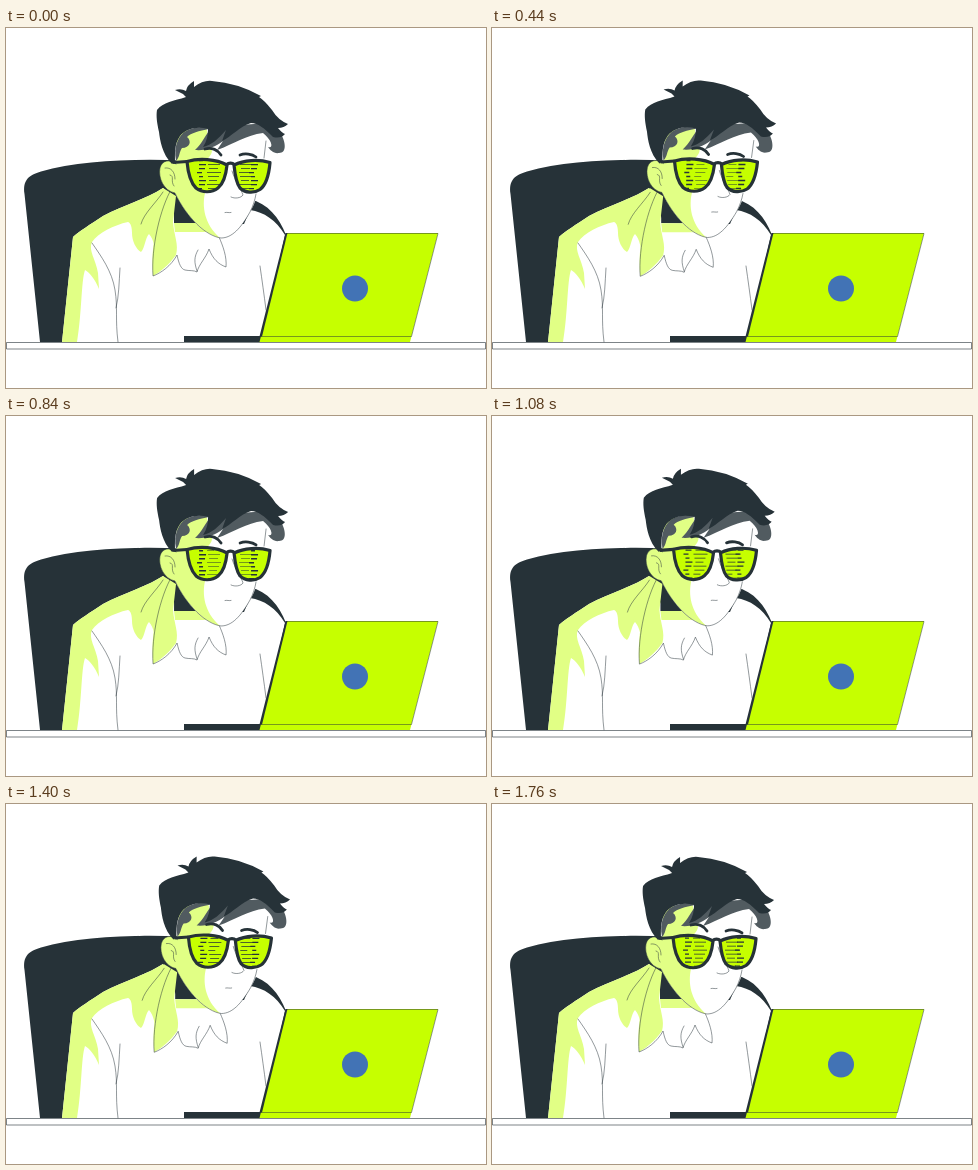
Recreate the animation shown at these times as an HTML page. Size 480 by 360 pixels, loop 1800 ms.

```html
<!DOCTYPE html>
<html lang="en">
<head>
<meta charset="utf-8">
<title>At the laptop</title>
<style>
  html, body { margin: 0; width: 100%; height: 100%; overflow: hidden; background: #fff; }
  svg { display: block; width: 100vw; height: 100vh; }
  .dark { fill: #263238; }
  .lime { fill: #c6ff00; }
  .pale { fill: #e1ff85; }
  .grey { fill: #515b60; }
  .white { fill: #fff; }
  .line { fill: none; stroke: #263238; stroke-width: .5; stroke-linecap: round; stroke-linejoin: round; }
  .bold { fill: none; stroke: #263238; stroke-width: 2.8; stroke-linecap: round; }
  .frame { fill: none; stroke: #263238; stroke-width: 3.2; stroke-linejoin: round; }
</style>
</head>
<body>
<svg viewBox="0 0 480 360">
  <defs>
    <path id="lensL" d="M181 133.5C193 130 210 131 221 137C220 147 217 156 212 160C206 165 196 165 190 160C185 155 182 145 181 133.5Z"/>
    <path id="lensR" d="M228 137C238 132 252 131 264 134.5C263 146 260 157 254 161.5C248 165.5 239 165 234 160C230 155 229 147 228 137Z"/>
    <clipPath id="clipL"><use href="#lensL"/></clipPath>
    <clipPath id="clipR"><use href="#lensR"/></clipPath>
  </defs>

  <!-- chair -->
  <path class="dark" d="M34 314L18.5 166C16.500 152 23 147 35 143.500C72 133 125 130.500 175 132.500L244 171C262 176 273 189 280 207L265 314Z"/>

  <!-- shirt -->
  <path class="white" d="M56 314L67 209C72 204 85 196 97 188C118 177 140 171 157 160L172 195L238 196L244 182C258 184 270 192 279 207L255 314Z"/>
  <path class="pale" d="M56 314L67 209C72 204 85 196 97 188C118 177 140 171 157 160L170 172L166 196L152 232C149 222 148 211 143 206C139 210 139 220 135 224C130 221 126 213 126 205C126 200 125 195 122 194C108 197 92 205 86 214C82 222 90 232 92 245L93 261C89 251 84 245 79 242C75 254 76 285 71 314Z"/>
  <path class="line" d="M86 215C95 228 106 243 109 262S109 290 112 314M114 240C113 255 113 268 110 280M254 238C256 252 258 266 260 282"/>

  <g id="collar">
    <path class="dark" d="M168 160L193 190L192 196L168 195Z"/>
    <path class="white" d="M168 195H202L213 209L220 239L203 221L191 244L178 242L171 227L147 248Z"/>
    <path class="pale" d="M168 195H192L212 208L204 204H169Z"/>
    <path class="pale" d="M157 160L170 168L167 194C168 208 173 216 170 227C163 237 154 244 147 248C145 228 148 206 153 193L140 206Z"/>
    <path class="line" d="M166 160C154 180 145 220 147 248C155 245 165 238 171 227C173 236 175 241 179 242S188 242 191 244C193 236 200 230 203 221C207 231 212 236 220 239C221 229 217 218 213 209M157 164C150 175 138 185 135 196M191 243C188 234 188 229 192 222"/>
  </g>

  <g id="head">
    <!-- face and ear -->
    <path class="white" d="M171 104L262 101C260 137 253 170 244 184C235 200 226 210 215 210C200 208 181 190 169 165Z"/>
    <path class="pale" d="M171 104L200 99L206 122C206 128 200 132 196 135L199 165C196 178 198 196 214 210C198 206 180 188 169 165C158 163 152 150 154 140C156 132 164 131 170 136Z"/>
    <path class="line" d="M170 136C164 131 156 132 154 140C152 150 158 163 169 165C181 190 200 208 215 210C226 210 235 200 244 184C247 178 249 172 250 166M258 130L260 113M159 140C165 139 169 144 169 151M164 147C169 148 164 153 168 158"/>

    <!-- hair -->
    <path class="grey" d="M170 133C167 118 173 107 180 103C187 99 197 98 203 101C193 103 185 105 181 109C186 113 184 120 176 120C173 124 174 129 170 133Z"/>
    <path class="grey" d="M189 122C196 116 199 107 206 99L262 95L274 104C280 114 281 125 273 125C268 126 264 122 262 119C268 121 266 112 257 105C240 107 228 116 211 122L217 113C209 119 200 123 189 122Z"/>
    <path class="dark" d="M166 136C156 126 154 112 153 104C151 95 150 88 151 82C157 74 168 73 180 69L177 66Q173 64 169 62Q175 60 180 63Q181 57 188 53L188 59Q197 52 206 53Q232 55 255 68L253 69Q258 72 266 82Q272 92 282 96Q278 100 272 100Q276 105 279 106Q275 111 267 109C258 100 252 95 245 95C234 98 225 109 216 113L220 102C212 111 206 117 197 119C201 113 202 107 202 101C190 98 180 101 174 108C168 116 169 127 169 134Z"/>

    <!-- features -->
    <path class="bold" d="M199 121C206 119 212 122 215 127M234 127C239 125 246 126 250 129"/>
    <path class="line" d="M226 143C229 153 235 161 237 167C235 170 229 171 225 169M219 184.500C221 184 223 185 225 184.500"/>

    <!-- glasses -->
    <use href="#lensL" class="lime"/>
    <use href="#lensR" class="lime"/>
    <g clip-path="url(#clipL)"><g id="codeL"></g></g>
    <g clip-path="url(#clipR)"><g id="codeR"></g></g>
    <use href="#lensL" class="frame"/>
    <use href="#lensR" class="frame"/>
    <path class="frame" d="M167 134.500L181 133.500M220 137C223 134.500 226 134.500 229 137"/>
  </g>

  <!-- desk and laptop -->
  <path d="M.5 314.500H479.500V321H.5Z" fill="#fff" stroke="#263238" stroke-width=".6"/>
  <path class="dark" d="M178 308H256V314H178Z"/>
  <path class="lime" d="M281 205H432L405.500 308L404 314H253.500Z"/>
  <path class="line" d="M280 205.500H432L405.500 308.500H254"/>
  <path class="dark" d="M279.500 205H281.500L256 308.500H253.500Z"/>
  <circle cx="349" cy="260.500" r="13" fill="#4273b5"/>
</svg>
<script>
  const PERIOD = 900, ROW = 4, ROWS = 8;
  const byId = id => document.getElementById(id);
  const ns = "http://www.w3.org/2000/svg";

  function bar(parent, x, y, width, height) {
    const el = document.createElementNS(ns, "rect");
    Object.entries({ x, y, width, height, fill: "#263238" })
      .forEach(([key, value]) => el.setAttribute(key, value));
    parent.append(el);
  }

  // Three identical pages let the text scroll without a seam.
  function fillLens(group, tagX, textX) {
    for (let i = 0; i < ROWS * 3; i++) {
      const k = i % ROWS, y = 132 + (i - ROWS) * ROW;
      bar(group, tagX + (k % 4 === 3 ? -2 : 0), y, 4 + k * 3 % 4, 1.4);
      bar(group, textX + k % 3, y + .4, 7 + k * 5 % 8, .6);
    }
  }
  fillLens(byId("codeL"), 193, 201);
  fillLens(byId("codeR"), 245, 233);

  function draw(time) {
    const phase = time % PERIOD / PERIOD;
    const lean = (1 - Math.cos(2 * Math.PI * phase)) / 2;
    const skew = -.0155 * lean;
    byId("head").setAttribute("transform",
      `matrix(1 0 ${skew} 1 ${-skew * 230} ${-.5 * lean})`);
    byId("collar").setAttribute("transform", `translate(${1.2 * lean} ${.3 * lean})`);
    for (const id of ["codeL", "codeR"])
      byId(id).setAttribute("transform", `translate(0 ${-phase * ROW * ROWS})`);
  }

  const start = performance.now();
  function tick() {
    draw(performance.now() - start);
    requestAnimationFrame(tick);
  }
  draw(0);
  tick();
</script>
</body>
</html>
```
